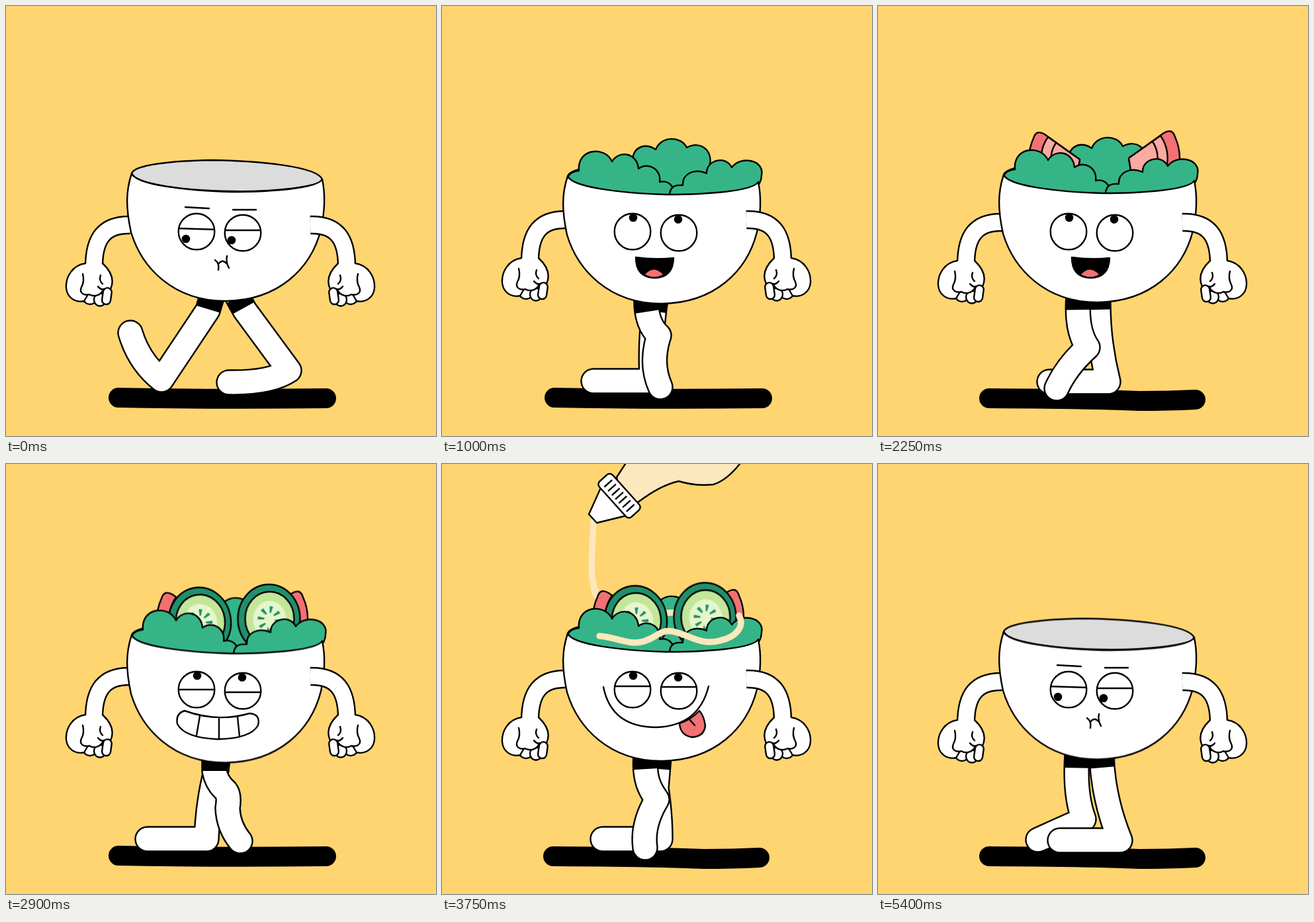
An HTML page without scripts for the animation above (5.45 s loop, 650x650 px).

```html
<!DOCTYPE html>
<html lang="en">
<head>
<meta charset="utf-8">
<title>Walking salad bowl</title>
<style>
html, body { margin: 0; width: 100%; height: 100%; overflow: hidden; background: #ffd571; }
svg { display: block; width: 100vw; height: 100vh; }
:root { --loop: 5450ms; --step: 389.285714ms; --pose: 48.660714ms; }

.ink { fill: none; stroke: #000; stroke-width: 2.4; stroke-linecap: round; stroke-linejoin: round; }
.white { fill: #fff; }
.green { fill: #35b587; }
.dark { fill: #228f6c; }
.red { fill: #f27172; }
.pink { fill: #fca9a0; }
.cream { fill: #fde7bd; }
.black { fill: #000; }

/* limbs: a wide black stroke with a narrower white one on top */
.out, .in, .band { fill: none; stroke-linejoin: round; }
.out { stroke: #000; stroke-width: 39.5; stroke-linecap: round; }
.in { stroke: #fff; stroke-width: 34.7; stroke-linecap: round; }
.band { stroke: #000; stroke-width: 38; stroke-dasharray: 19 999; }
.arm .out { stroke-width: 28.4; stroke-linecap: butt; }
.arm .in { stroke-width: 23.6; stroke-linecap: butt; }

.pose { visibility: hidden; animation: pose var(--step) step-end calc((var(--k) - 8.2) * var(--pose)) infinite; }
@keyframes pose { 0% { visibility: visible } 12.5%, 100% { visibility: hidden } }

.bob { animation: bob var(--step) step-end -9.732ms infinite; }
@keyframes bob {
  0% { transform: translateY(0) } 12.5% { transform: translateY(.5px) }
  25% { transform: translateY(1px) } 37.5% { transform: translateY(5.5px) }
  50% { transform: translateY(4px) } 62.5% { transform: translateY(3px) }
  75% { transform: translateY(2px) } 87.5%, 100% { transform: translateY(.5px) }
}
.swing { animation: swing var(--step) step-end -9.732ms infinite; }
@keyframes swing {
  0%, 12.5% { transform: translateY(0) } 25% { transform: translateY(-2px) }
  37.5% { transform: translateY(-10px) } 50% { transform: translateY(-8px) }
  62.5% { transform: translateY(-6px) } 75% { transform: translateY(-4px) }
  87.5%, 100% { transform: translateY(-2px) }
}

.shade { fill: none; stroke: #000; stroke-width: 30; stroke-linecap: round; animation: boil 99.0909ms step-end infinite; }
.shade.alt { animation-delay: -49.54545ms; }
@keyframes boil { 0% { visibility: visible } 50%, 100% { visibility: hidden } }

.face { visibility: hidden; animation: var(--f) var(--loop) step-end infinite; }
@keyframes bored { 0%, 92.66%, 100% { visibility: visible } 12.84% { visibility: hidden } }
@keyframes awake { 0% { visibility: hidden } 12.84% { visibility: visible } 92.66%, 100% { visibility: hidden } }
@keyframes happy { 0% { visibility: hidden } 12.84% { visibility: visible } 43.12%, 100% { visibility: hidden } }
@keyframes grin { 0% { visibility: hidden } 43.12% { visibility: visible } 61.47%, 100% { visibility: hidden } }
@keyframes yum { 0% { visibility: hidden } 61.47% { visibility: visible } 77.98%, 100% { visibility: hidden } }
@keyframes angry { 0% { visibility: hidden } 77.98% { visibility: visible } 92.66%, 100% { visibility: hidden } }
.lid { animation: lid var(--loop) linear infinite; }
@keyframes lid {
  0%, 5.5% { transform: none } 9.17% { transform: translateY(-9px) }
  12.84%, 90% { transform: translateY(-24px) } 90.1%, 100% { transform: none }
}

.food { animation: lift var(--loop) infinite; }
@keyframes lift {
  0%, 10% { transform: translateY(-420px) }
  10.01%, 74.3% { transform: none; animation-timing-function: ease-in }
  79.8%, 100% { transform: translateY(-420px) }
}
.leaf, .tom, .cuke { animation: leaf var(--loop) linear var(--d, 0ms) infinite backwards; }
.tom { animation-name: tom; }
.cuke { animation-name: cuke; }
@keyframes leaf {
  0%, 11.01% { transform: translateY(-420px); animation-timing-function: ease-in }
  14.68%, 100% { transform: none }
}
@keyframes tom {
  0%, 26.6% { transform: translate(-10px, -400px) rotate(-45deg) }
  28.44% { transform: translate(-8px, -275px) rotate(-33deg) }
  32.1%, 100% { transform: none }
}
@keyframes cuke {
  0%, 43.1% { transform: translateY(-420px) rotate(-40deg); animation-timing-function: ease-in }
  47.7%, 100% { transform: none }
}

.sauce, .stream { fill: none; stroke: #fde7bd; stroke-width: 9.5; stroke-linecap: round; stroke-linejoin: round; }
.sauce { stroke-dasharray: 1 3; animation: var(--f) var(--loop) linear infinite; }
@keyframes front { 0%, 61.47% { stroke-dashoffset: 1.06 } 65.14%, 100% { stroke-dashoffset: 0 } }
@keyframes back { 0%, 65.14% { stroke-dashoffset: 1.06 } 68.8%, 100% { stroke-dashoffset: 0 } }
.pour { animation: pour var(--loop) ease-in-out infinite; }
@keyframes pour {
  0%, 57.8% { transform: translate(10px, -160px) }
  61.47% { transform: translate(10px, 0) }
  65.14% { transform: translate(220px, 0) }
  68.8%, 71.56% { transform: none }
  75.2%, 100% { transform: translate(0, -160px) }
}
.stream { animation: stream var(--loop) step-end infinite; }
@keyframes stream { 0% { visibility: hidden } 61.47% { visibility: visible } 71.56%, 100% { visibility: hidden } }
</style>
</head>
<body>
<svg viewBox="0 0 650 650">
<defs>
  <!-- s: standing or leading leg, w: the other leg -->
  <path id="s0" d="M311 440L305 460L235 565Q201 538 188 494"/>
  <path id="w0" d="M350 440L361 460L428 551Q400 570 337 569"/>
  <path id="s1" d="M311 440L305 460L236 567Q203 541 188 497"/>
  <path id="w1" d="M353 440L359 462Q368 500 390 504L437 518L385 571"/>
  <path id="s2" d="M311 440L305 460L237 569Q204 545 189 501"/>
  <path id="w2" d="M356 440L357 462Q358 500 380 494L412 485Q434 478 435 505L433 567"/>
  <path id="s3" d="M320 445L318 462Q305 510 303 567H214"/>
  <path id="w3" d="M315 445L315 464Q318 480 329 491Q339 498 335 520Q336 548 354 570"/>
  <path id="s4" d="M323 443Q314 500 317 567H229"/>
  <path id="w4" d="M309 443Q308 480 328 498Q314 540 330 576"/>
  <path id="s5" d="M328 442L324 490Q330 530 330 567H243"/>
  <path id="w5" d="M308 442C305 475 314 492 325 507Q302 545 307 580"/>
  <path id="s6" d="M333 440Q332 505 348 568H259"/>
  <path id="w6" d="M303 440Q299 490 317 516Q285 545 270 578"/>
  <path id="s7" d="M338 440Q340 505 366 569H275"/>
  <path id="w7" d="M301 440Q297 500 311 537L242 568"/>

  <path id="limb" d="M188 331C148 330 133 352 133 394"/>
  <g id="arm" class="arm">
    <use href="#limb" class="out"/><use href="#limb" class="in"/>
    <g class="ink white">
      <ellipse cx="127" cy="442" rx="10" ry="9"/>
      <ellipse cx="142" cy="444" rx="9" ry="9.5"/>
      <path d="M120 389C100 392 90 410 91 426C92 440 104 449 118 446L124 436L147 428L158 428C164 415 160 402 146 389"/>
      <rect x="146" y="426" width="13" height="25" rx="6.5" transform="rotate(8 152 438)"/>
      <path d="M116 405Q119 416 114 425C110 434 118 438 126 436C133 440 143 438 147 429M147 429Q142 428 139 424M146 420Q140 415 143 407"/>
    </g>
  </g>

  <g id="slice" class="ink">
    <path class="red" d="M0 0L-13 76A77 77 0 0 1 -70 -32Q-66 -46 -53 -38Z"/>
    <path class="pink" d="M0 0L-10 58A59 59 0 0 1 -48 -34Z"/>
    <path d="M-8 43A44 44 0 0 1 -36 -25"/>
  </g>
  <g id="disc">
    <ellipse class="ink dark" rx="47" ry="52"/>
    <ellipse class="ink" cx="1" rx="37" ry="41" style="fill:#c3e698"/>
    <ellipse cx="1" cy="1" rx="25" ry="28" fill="#e6f6cb"/>
    <ellipse cx="1" cy="1" rx="13" ry="15" pathLength="8" fill="none" stroke="#228f6c" stroke-width="10" stroke-dasharray=".34 .66"/>
  </g>
  <g id="eyes" class="ink white"><circle cx="288" cy="341" r="27.3"/><circle cx="358" cy="343" r="27.3"/></g>
  <clipPath id="sockets"><circle cx="288" cy="341" r="27.3"/><circle cx="358" cy="343" r="27.3"/></clipPath>
</defs>

<rect width="650" height="650" fill="#ffd571"/>
<path class="shade" d="M170 592Q320 595 484 593"/>
<path class="shade alt" d="M168 593Q320 594 395 597Q440 597 480 595"/>

<g class="pose" style="--k:0">
  <use href="#s0" class="out"/><use href="#s0" class="in"/><use href="#s0" class="band"/>
  <use href="#w0" class="out"/><use href="#w0" class="in"/><use href="#w0" class="band"/>
</g>
<g class="pose" style="--k:1">
  <use href="#s1" class="out"/><use href="#s1" class="in"/><use href="#s1" class="band"/>
  <use href="#w1" class="out"/><use href="#w1" class="in"/><use href="#w1" class="band"/>
</g>
<g class="pose" style="--k:2">
  <use href="#s2" class="out"/><use href="#s2" class="in"/><use href="#s2" class="band"/>
  <use href="#w2" class="out"/><use href="#w2" class="in"/><use href="#w2" class="band"/>
</g>
<g class="pose" style="--k:3">
  <use href="#s3" class="out"/><use href="#s3" class="in"/><use href="#s3" class="band"/>
  <use href="#w3" class="out"/><use href="#w3" class="in"/><use href="#w3" class="band"/>
</g>
<g class="pose" style="--k:4">
  <use href="#s4" class="out"/><use href="#s4" class="in"/><use href="#s4" class="band"/>
  <use href="#w4" class="out"/><use href="#w4" class="in"/><use href="#w4" class="band"/>
</g>
<g class="pose" style="--k:5">
  <use href="#s5" class="out"/><use href="#s5" class="in"/><use href="#s5" class="band"/>
  <use href="#w5" class="out"/><use href="#w5" class="in"/><use href="#w5" class="band"/>
</g>
<g class="pose" style="--k:6">
  <use href="#s6" class="out"/><use href="#s6" class="in"/><use href="#s6" class="band"/>
  <use href="#w6" class="out"/><use href="#w6" class="in"/><use href="#w6" class="band"/>
</g>
<g class="pose" style="--k:7">
  <use href="#w7" class="out"/><use href="#w7" class="in"/><use href="#w7" class="band"/>
  <use href="#s7" class="out"/><use href="#s7" class="in"/><use href="#s7" class="band"/>
</g>

<g class="swing"><use href="#arm"/></g>

<g class="bob">
  <path class="ink" style="fill:#dcdcdc" d="M190 253C194 240 250 234 310 233C380 234 470 242 478 262C476 274 400 281 340 280C270 279 196 270 190 253Z"/>
  <g class="food">
    <path class="ink green leaf" d="M289 238C283 212 305 200 323 213C331 192 361 192 370 210C391 199 409 214 405 236C404 300 300 310 289 238Z"/>
    <path class="sauce" style="--f:back" pathLength="1" d="M449 226Q400 219 340 222Q262 222 238 202Q233 196 230 188"/>
    <g class="pour"><path class="stream" d="M229 84C227 130 222 172 234 194L238 202"/></g>
    <g transform="translate(305 230)"><g class="tom"><use href="#slice"/></g></g>
    <g transform="translate(379 228) scale(-1 1)"><g class="tom" style="--d:150ms"><use href="#slice"/></g></g>
    <g transform="translate(293 233) rotate(-8)"><g class="cuke"><use href="#disc"/></g></g>
    <g transform="translate(397.5 228.5)"><g class="cuke" style="--d:120ms"><use href="#disc"/></g></g>
    <path class="ink green leaf" style="--d:100ms" d="M190 258Q190 247 207 245C204 211 246 207 257 231C268 213 295 218 297 242C312 231 332 243 329 262C342 259 352 268 350 282Q260 330 190 258Z"/>
    <path class="ink green leaf" style="--d:200ms" d="M344 281C345 269 352 266 364 267C363 249 382 241 400 249C399 229 429 221 438 240C451 222 488 228 483 252Q483 260 478 267Q420 330 344 281Z"/>
    <path class="sauce" style="--f:front" pathLength="1" d="M238 257C265 259 285 272 305 265C325 259 330 247 348 250C375 255 390 272 420 264C445 259 458 242 449 226"/>
  </g>
  <path class="ink white" d="M190 253C196 270 270 279 340 281C400 281 470 276 478 262C483 285 482 310 476 338C461 397 412 445 332 446C252 446 205 395 189 342C181 305 181 280 190 253Z"/>
</g>

<use href="#eyes"/>
<g class="face" style="--f:bored">
  <g clip-path="url(#sockets)"><path class="ink lid" d="M255 336L320 338M325 339H390"/></g>
  <circle cx="272" cy="352" r="6.3"/><circle cx="341" cy="354" r="6.3"/>
  <path class="ink" d="M271 304L307 306M343 308H378M316 384Q323 389 321 399M321 390Q327 382 333 389M334 378Q332 387 337 396"/>
</g>
<g class="face" style="--f:awake"><circle cx="289" cy="320" r="6.3"/><circle cx="357" cy="322.5" r="6.3"/></g>
<g class="face" style="--f:happy">
  <path class="ink black" d="M293 380Q322 384 350 381Q349 411 321 411Q293 410 293 380Z"/>
  <path class="red" d="M307 406Q320 391 334 406Q321 413 307 406Z"/>
</g>
<g class="face ink" style="--f:grin">
  <path d="M261 341H315M331 345H385"/>
  <path class="white" d="M270 373Q320 391 368 377Q385 378 381 395Q370 415 320 416Q270 414 259 393Q256 377 270 373Z"/>
  <path d="M293 381L288 410M322 384V416M350 382L353 412"/>
</g>
<g class="face ink" style="--f:yum">
  <path d="M261 336H315M331 337H385"/>
  <path class="red" d="M359 392Q360 410 378 413Q396 412 398 396Q396 380 389 373Q376 387 359 392Z"/>
  <path d="M244 337Q256 398 324 398Q388 396 403 336M374 386L382 395"/>
</g>
<g class="face ink" style="--f:angry">
  <path d="M284 298L315 325M371 300L332 325"/>
  <path class="black" d="M300 396Q302 377 326 377Q350 378 352 394Q350 403 336 400Q322 396 312 403Q300 405 300 396Z"/>
</g>

<g class="swing"><use href="#arm" transform="translate(648 0) scale(-1 1)"/></g>

<g class="pour ink">
  <path class="cream" d="M264 20L277 0L400 -160H600L450 0Q430 25 410 31Q385 34 358 26Q330 32 296 58L270 50Z"/>
  <path class="white" d="M240 36L222 76L234 89L279 78Z"/>
  <g transform="translate(268 48) rotate(48)">
    <rect class="white" x="-36" y="-13.5" width="72" height="27" rx="6"/>
    <path d="M-25 -7V7M-16.5 -7V7M-8 -7V7M0 -7V7M8 -7V7M16.5 -7V7M25 -7V7"/>
  </g>
</g>
</svg>
</body>
</html>
```
